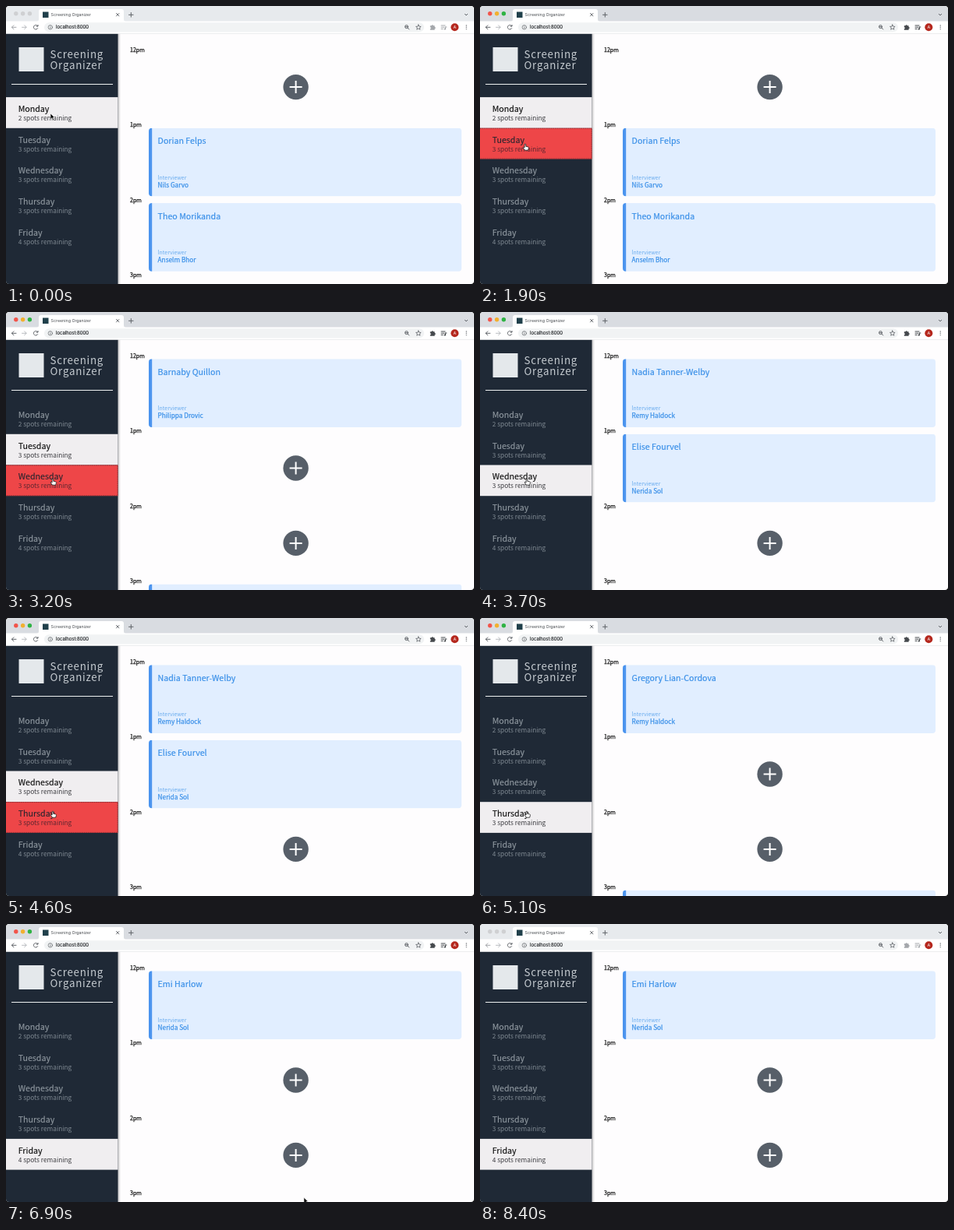
These frames come from a looping animation (600x357 px, 8.5 s). An HTML page:

```html
<!DOCTYPE html>
<html lang="en">
<head>
<meta charset="utf-8">
<title>Screening Organizer</title>
<style>
  html, body { margin: 0; width: 100%; height: 100%; overflow: hidden; background: #000; }
  svg { display: block; width: 600px; height: 357px; border-radius: 4px; }
  text { font-family: "Noto Sans CJK JP", "Noto Sans CJK", "Noto Sans", sans-serif; }
  .ui text { font-family: Inter, Roboto, sans-serif; }
  .brand { font-size: 13.3px; font-weight: 300; letter-spacing: .75px; fill: #c6ccd1; }
  .day { font-size: 10.65px; stroke-width: .15; }
  .spots { font-size: 8.3px; font-weight: 300; }
  .hour { font-size: 7.1px; fill: #111; stroke: #111; stroke-width: .25; }
  .student { font-size: 10.65px; fill: #3b90e8; stroke: #3b90e8; stroke-width: .2; }
  .label { font-size: 6.9px; font-weight: 300; fill: #6aacee; }
  .host { font-size: 8.25px; fill: #3b90e8; stroke: #3b90e8; stroke-width: .25; }
  .stroke { fill: none; stroke: #5f6368; stroke-width: 1; stroke-linecap: round; stroke-linejoin: round; }
</style>
</head>
<body>
<svg id="stage" viewBox="0 0 600 357">
  <defs>
    <linearGradient id="shade">
      <stop offset="0" stop-color="#000" stop-opacity=".25"/>
      <stop offset="1" stop-color="#000" stop-opacity="0"/>
    </linearGradient>
    <clipPath id="cardClip"><rect width="401" height="87.6" rx="4"/></clipPath>
  </defs>
  <rect width="600" height="357" fill="#fefdfe"/>
  <g id="pages"></g>
  <g id="hours"></g>

  <rect x="143" y="35" width="4" height="322" fill="url(#shade)"/>
  <rect y="35" width="143.5" height="322" fill="#1f2936"/>
  <rect x="16.5" y="53" width="32" height="31" fill="#e4e8eb"/>
  <text class="brand" x="56.5" y="66.8">Screening</text>
  <text class="brand" x="56.5" y="81.2">Organizer</text>
  <rect x="7" y="100" width="130" height="1" fill="#eef0f1"/>
  <g id="days"></g>

  <g class="ui">
    <rect id="strip" width="600" height="24"/>
    <g id="lights"></g>
    <path d="M39 20q3 0 3-3V7q0-3 3-3H148q3 0 3 3V17q0 3 3 3z" fill="#fff"/>
    <rect x="47" y="7.5" width="7.5" height="7.5" fill="#20404b"/>
    <text x="57.6" y="13.2" font-size="5.3" fill="#45494d">Screening Organizer</text>
    <path class="stroke" d="M141.5 9.5l3.4 3.4m0-3.4l-3.4 3.4M157.5 11.3h5.6m-2.8-2.8v5.6"/>
    <path class="stroke" d="M588.3 10.3l1.7 1.7 1.7-1.7"/>
    <rect y="19.5" width="600" height="16.1" fill="#fff"/>
    <rect y="35" width="600" height=".6" fill="#e1e3e5"/>
    <rect x="49" y="21.2" width="487" height="12.2" rx="6.1" fill="#f1f3f4"/>
    <path class="stroke" id="back" d="M13 27.3H7.4m2.5-2.5l-2.5 2.5 2.5 2.5"/>
    <path class="stroke" style="stroke:#b9bcc0" d="M20.5 27.3h5.6m-2.5-2.5l2.5 2.5-2.5 2.5"/>
    <path class="stroke" d="M40.6 25.7a2.8 2.8 0 1 0 .1 2.9M41 24.4v1.7h-1.8"/>
    <circle class="stroke" style="stroke-width:.7" cx="56.8" cy="27.3" r="2.7"/>
    <path class="stroke" style="stroke-width:.7" d="M56.8 27.1v1.5m0-2.8v.1"/>
    <text x="64" y="29.3" font-size="5.95" fill="#202326" stroke="#202326" stroke-width=".15">localhost:8000</text>
    <circle class="stroke" cx="513.5" cy="26.6" r="2"/>
    <path class="stroke" d="M515 28.2l1.8 1.8m-4.2-3.4h1.8"/>
    <path class="stroke" style="stroke-width:.8" d="M528.8 24l1 2.2 2.3.2-1.8 1.5.6 2.3-2.1-1.2-2.1 1.2.6-2.3-1.8-1.5 2.3-.2z"/>
    <g id="tools">
      <path d="M543.8 25.3h1.8a1.1 1.1 0 0 1 2.2 0h1.8v1.8a1.1 1.1 0 0 1 0 2.2v1.5h-5.8v-1.6a1 1 0 0 0 0-2z" fill="currentColor"/>
      <path class="stroke" style="stroke:currentColor" d="M558 25h5m-5 2.2h4m-4 2.2h2.2m3.2-2.4v2.5m0-2.5h1.5"/>
      <circle cx="562.7" cy="29.6" r="1.1" fill="currentColor"/>
    </g>
    <circle cx="575.3" cy="27.2" r="5" fill="#b5281e"/>
    <text x="575.3" y="29.2" font-size="5.4" fill="#fff" text-anchor="middle">A</text>
    <g fill="#5f6368"><circle cx="590.2" cy="25" r=".7"/><circle cx="590.2" cy="27.3" r=".7"/><circle cx="590.2" cy="29.6" r=".7"/></g>
  </g>

  <g id="cursor">
    <path id="arrow" d="M0 0v7.4l1.8-1.6 1.2 2.7 1.3-.6-1.2-2.6h2.3z" fill="#000" stroke="#fff" stroke-width=".6"/>
    <path id="hand" d="M-.9-3.4q.9-1 1.7 0V-.7l2.8.6q1 .3.8 1.5L3.7 4.2H-.5L-2.9.9q.3-1.1 1.3-.4l.7.6z" fill="#fff" stroke="#111" stroke-width=".75" stroke-linejoin="round"/>
  </g>
</svg>
<script>
const LOOP = 8500, STEP = 100, ROW = 96.4, TOP = 117.1, ITEM = 39.7;
const $ = id => document.getElementById(id);

const days = [["Monday", 2], ["Tuesday", 3], ["Wednesday", 3], ["Thursday", 3], ["Friday", 4]];
const empty = null, unseen = ["", ""];
const schedule = [
  [empty, ["Dorian Felps", "Nils Garvo"], ["Theo Morikanda", "Anselm Bhor"], empty],
  [["Barnaby Quillon", "Philippa Drovic"], empty, empty, unseen],
  [["Nadia Tanner-Welby", "Remy Haldock"], ["Elise Fourvel", "Nerida Sol"], empty, empty],
  [["Gregory Lian-Cordova", "Remy Haldock"], empty, empty, unseen],
  [["Emi Harlow", "Nerida Sol"], empty, empty, empty]
];

const openings = [0, 2000, 3400, 4800, 6200];
const focus = [900, 7500];
// time, x, y of the pointer
const path = [
  [0, 57, 138], [1000, 57, 140], [1700, 58, 181], [2500, 58, 181], [3000, 60, 218],
  [3700, 60, 218], [4400, 60, 252], [5100, 60, 252], [5700, 58, 300], [6400, 58, 300],
  [7100, 462, 364]
];

const colors = {
  idle: { box: "none", name: "#8e979f", spots: "#7f8992" },
  open: { box: "#f0eef0", name: "#111", spots: "#3c3c40" },
  hot: { box: "#ee4648", name: "#2b262f", spots: "#5e2730" }
};

const slot = (entry, row) => {
  const y = 60.3 + row * ROW;
  if (!entry) return `<circle cx="371.6" cy="${y + 43.8}" r="16.2" fill="#575f69"/>
    <path d="M363.6 ${y + 43.8}h16m-8-8v16" stroke="#fff" stroke-width="2"/>`;
  return `<g transform="translate(183 ${y})"><g clip-path="url(#cardClip)">
    <rect width="401" height="88" fill="#e1eeff"/><rect width="4.2" height="88" fill="#4b94ee"/></g>
    <text class="student" x="11.6" y="20.7">${entry[0]}</text>
    <text class="label" x="11.6" y="66">Interviewer</text>
    <text class="host" x="11.6" y="75.9">${entry[1]}</text></g>`;
};

$("pages").innerHTML = schedule.map(page => `<g>${page.map(slot).join("")}</g>`).join("");
$("hours").innerHTML = ["12pm", "1pm", "2pm", "3pm"].map((hour, i) =>
  `<text class="hour" x="159" y="${58.7 + i * ROW}">${hour}</text>`).join("");
$("days").innerHTML = days.map(([name, count], i) => `<g transform="translate(0 ${TOP + i * ITEM})">
  <rect width="143.5" height="${ITEM}"/>
  <path d="M0 .5H143V39.2H0" fill="none" stroke="#7d2b31" stroke-width=".8" stroke-dasharray="1.4 1"/>
  <text class="day" x="15.7" y="18.8">${name}</text>
  <text class="spots" x="15.7" y="29.8">${count} spots remaining</text></g>`).join("");
$("lights").innerHTML = [12.8, 21.6, 30.4].map(x => `<circle cx="${x}" cy="9.7" r="2.7"/>`).join("");

function pointer(t) {
  const next = path.findIndex(point => point[0] > t);
  if (next < 0) return path[path.length - 1].slice(1);
  const [t0, x0, y0] = path[next - 1], [t1, x1, y1] = path[next];
  const p = (t - t0) / (t1 - t0), ease = p * p * (3 - 2 * p);
  return [x0 + (x1 - x0) * ease, y0 + (y1 - y0) * ease];
}

function render(t) {
  const active = t >= focus[0] && t < focus[1];
  const selected = openings.filter(start => t >= start).length - 1;
  const [x, y] = pointer(t);
  const hovered = x < 143 ? Math.floor((y - TOP) / ITEM) : -1;

  [...$("pages").children].forEach((page, i) => page.style.display = i === selected ? "" : "none");
  [...$("days").children].forEach((item, i) => {
    const [box, border, name, spots] = item.children;
    const state = i === selected ? "open" : i === hovered ? "hot" : "idle";
    const color = colors[state];
    box.setAttribute("fill", color.box);
    border.style.display = state === "hot" ? "" : "none";
    name.setAttribute("fill", color.name);
    name.setAttribute("stroke", color.name);
    spots.setAttribute("fill", color.spots);
  });

  $("strip").setAttribute("fill", active ? "#d9dce1" : "#e7eaed");
  [...$("lights").children].forEach((light, i) =>
    light.setAttribute("fill", active ? ["#f2544a", "#f2b02f", "#2fb344"][i] : "#cfd0d2"));
  $("tools").setAttribute("color", active ? "#45494d" : "#a4a7ab");
  $("back").style.stroke = active ? "#5f6368" : "#a4a7ab";

  const hand = active && hovered >= 0;
  $("cursor").setAttribute("transform", `translate(${x} ${y})`);
  $("hand").style.display = hand ? "" : "none";
  $("arrow").style.display = hand ? "none" : "";
}

const start = performance.now();
function tick(now) {
  const t = Math.max(0, now - start) % LOOP;
  render(Math.floor(t / STEP) * STEP);
  requestAnimationFrame(tick);
}
render(0);
requestAnimationFrame(tick);
</script>
</body>
</html>
```
